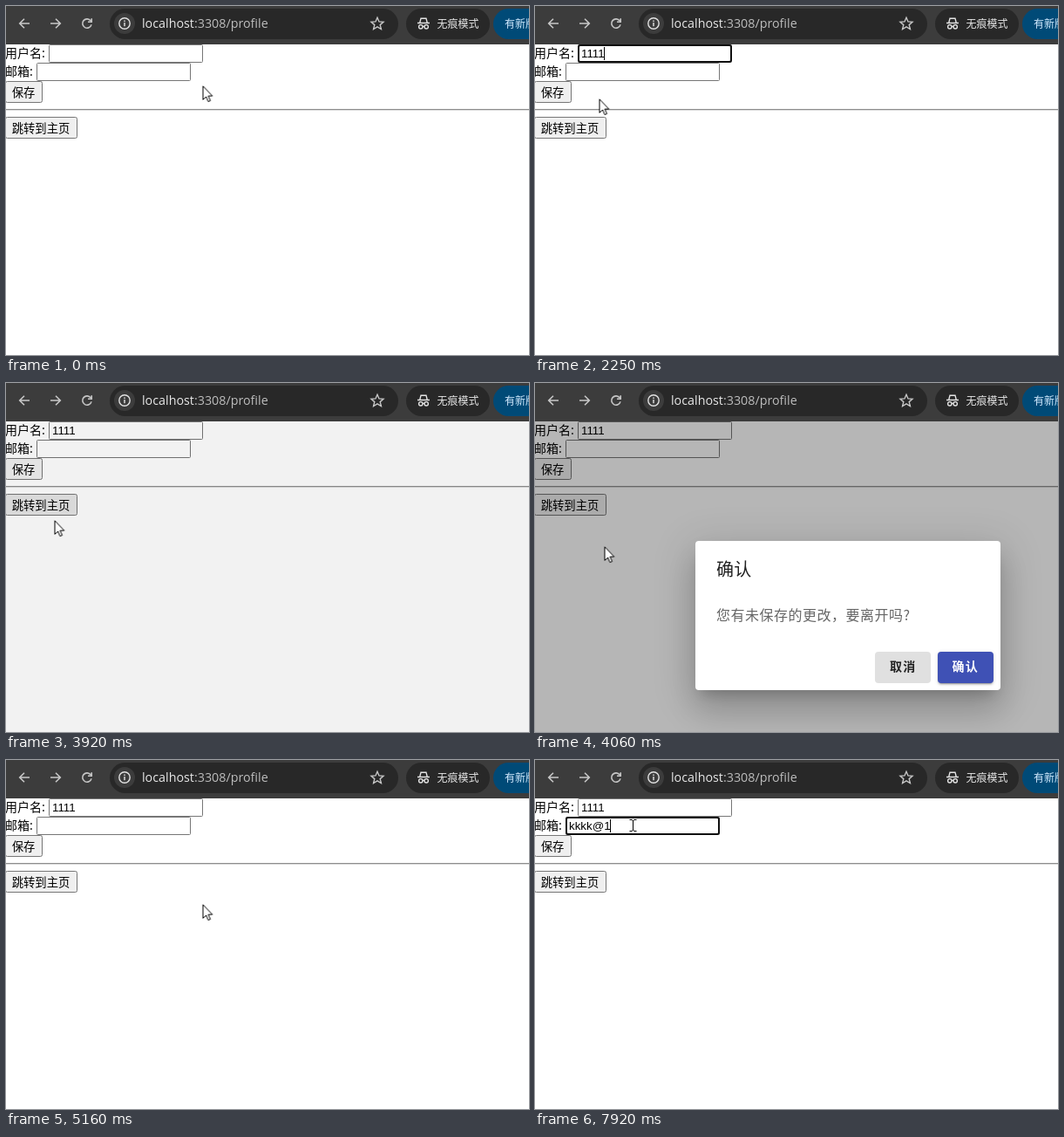
An HTML page for the animation above (8000 ms loop, 600x400 px).

```html
<!DOCTYPE html>
<html lang="zh-CN">
<head>
<meta charset="utf-8">
<title>Profile form</title>
<style>
html, body { margin: 0; width: 100%; height: 100%; overflow: hidden; background: #fff; }
body { position: relative; font-family: "Noto Sans CJK SC", "Noto Sans CJK", sans-serif; }
svg.layer { position: absolute; left: 0; top: 0; width: 600px; height: 400px; }
svg { display: block; }
.anim { animation: 8s step-end infinite; }

/* page */
.label { font-size: 14px; }
.btn text { font-size: 13.333px; }
.btn rect { fill: #efefef; stroke: #767676; }
.value { font: 13.333px "Liberation Sans", Arial, sans-serif; }
.box { fill: #fff; stroke: #767676; }
.ring { fill: none; stroke: #101010; stroke-width: 2; }

/* dialog */
.shade { position: absolute; left: 0; top: 44px; width: 600px; height: 356px; background: #000; }
.dialog {
  position: absolute; left: 184px; top: 181px; width: 350px; height: 171px;
  border-radius: 4px; background: #fff;
  box-shadow: 0 11px 15px -7px rgba(0,0,0,.2), 0 24px 38px 3px rgba(0,0,0,.14), 0 9px 46px 8px rgba(0,0,0,.12);
}
.dialog svg { position: absolute; left: 0; top: 0; }
.accept {
  position: absolute; left: 278px; top: 127px; width: 64px; height: 36px;
  border-radius: 4px; background: #3f51b5;
  box-shadow: 0 3px 1px -2px rgba(0,0,0,.2), 0 2px 2px rgba(0,0,0,.14), 0 1px 5px rgba(0,0,0,.12);
}
.title { font-size: 20px; letter-spacing: .25px; fill: rgba(0,0,0,.87); }
.message { font-size: 16px; letter-spacing: .5px; fill: rgba(0,0,0,.6); }
.action { font-size: 14px; font-weight: 700; letter-spacing: 1.25px; }

/* toolbar */
.icon { fill: none; stroke: #c7c7c7; stroke-width: 1.6; }
.url { font: 14.3px "Open Sans", "Noto Sans", sans-serif; fill: #bdbdbd; }
.pill { fill: #282828; }
.chip { font-size: 12px; }

/* timeline: percent = ms / 80 */
.cursor { animation-name: move; }
@keyframes move {
  0% { transform: translate(225.5px, 91px); animation-timing-function: steps(9); }
  7.775% { transform: translate(133px, 60px); }
  14.625% { transform: translate(136px, 62px); }
  24.625% { transform: translate(136px, 62px); animation-timing-function: steps(4); }
  28.125% { transform: translate(73.5px, 106px); animation-timing-function: steps(3); }
  30.75% { transform: translate(26px, 101px); }
  38.125% { transform: translate(26px, 101px); animation-timing-function: steps(6); }
  43.25% { transform: translate(43.5px, 142px); }
  48.125% { transform: translate(43.5px, 142px); animation-timing-function: steps(3); }
  50.75% { transform: translate(79.5px, 187px); animation-timing-function: steps(7); }
  56.875% { transform: translate(419px, 330px); }
  57.75% { transform: translate(417px, 329px); }
  62.75% { transform: translate(413px, 324px); animation-timing-function: steps(2); }
  64.5% { transform: translate(225.5px, 165px); animation-timing-function: steps(9); }
  72.25% { transform: translate(160px, 98px); animation-timing-function: steps(5); }
  76.5%, 100% { transform: translate(112px, 75px); }
}
.arrow { animation-name: arrow; }
@keyframes arrow {
  0%, 27.25%, 63.625% { opacity: 1; }
  1.73%, 56.875%, 74.8%, 100% { opacity: 0; }
}
.beam { animation-name: beam; }
@keyframes beam {
  0%, 27.25% { opacity: 0; }
  1.73%, 74.8%, 100% { opacity: 1; }
}
.hand { animation-name: hand; }
@keyframes hand {
  0%, 63.625%, 100% { opacity: 0; }
  56.875% { opacity: 1; }
}
.press { animation-name: press; }
@keyframes press {
  0%, 10.375%, 37.25%, 49%, 62.75%, 78.25%, 100% { opacity: 0; }
  8.625%, 36.5%, 47.375%, 61.875%, 77.375% { opacity: 1; }
}
.ring.name { animation-name: focus-name; }
@keyframes focus-name {
  0%, 36.5%, 100% { opacity: 0; }
  8.625% { opacity: 1; }
}
.ring.mail { animation-name: focus-mail; }
@keyframes focus-mail {
  0% { opacity: 0; }
  77.375%, 100% { opacity: 1; }
}
.caret.name { animation-name: blink-name; }
@keyframes blink-name {
  0%, 14.625%, 36.5%, 100% { opacity: 0; }
  8.625%, 15.5% { opacity: 1; }
}
.caret.mail { animation-name: blink-mail; }
@keyframes blink-mail {
  0%, 83.25% { opacity: 0; }
  77.375%, 85%, 100% { opacity: 1; }
}
.type.name { animation-name: type-name; }
@keyframes type-name {
  0% { transform: translateX(0); }
  15.5% { transform: translateX(7px); }
  18.75% { transform: translateX(13px); }
  21.25% { transform: translateX(20px); }
  22.875%, 100% { transform: translateX(26px); }
}
.type.mail { animation-name: type-mail; }
@keyframes type-mail {
  0% { transform: translateX(0); }
  85% { transform: translateX(7px); }
  86.625% { transform: translateX(13px); }
  89.125% { transform: translateX(20px); }
  90.75% { transform: translateX(27px); }
  95.625% { transform: translateX(40px); }
  99%, 100% { transform: translateX(47px); }
}
.save rect { animation-name: save; }
@keyframes save {
  0%, 39.83%, 100% { fill: #efefef; }
  29.875%, 37.25% { fill: #e5e5e5; }
  36.5% { fill: #f5f5f5; }
}
.home rect { animation-name: home; }
@keyframes home {
  0%, 50.75%, 100% { fill: #efefef; }
  41.54%, 49% { fill: #e5e5e5; }
  47.375% { fill: #f5f5f5; }
}
.shade { animation-name: shade; }
@keyframes shade {
  0%, 64.5%, 100% { opacity: 0; }
  49% { opacity: .05; }
  49.875% { opacity: .2; }
  50.75% { opacity: .286; }
  51.625% { opacity: .305; }
  53.375% { opacity: .32; }
  62.75% { opacity: .295; }
  63.625% { opacity: .14; }
}
.dialog { animation-name: dialog; }
@keyframes dialog {
  0%, 63.625%, 100% { opacity: 0; transform: none; }
  49.875% { opacity: .6; transform: scale(.93); }
  50.75% { opacity: 1; transform: none; }
  62.75% { opacity: .8; transform: none; }
}
.ripple { animation-name: ripple; }
@keyframes ripple {
  0%, 63.625%, 100% { opacity: 0; transform: scale(.4); }
  61.875% { opacity: .06; transform: scale(.4); }
  62.75% { opacity: .11; transform: none; }
}
</style>
</head>
<body>

<svg class="layer" viewBox="0 0 600 400">
  <text class="label" x="-1" y="59">用户名:</text>
  <text class="label" x="-1" y="80">邮箱:</text>

  <rect class="box" x="49.5" y="44.5" width="176" height="20" rx="1"/>
  <text class="value" x="53" y="59">1111</text>
  <svg x="51" y="46" width="173" height="17">
    <g class="type name anim">
      <rect x="2" width="180" height="17" fill="#fff"/>
      <rect class="caret name anim" x="2" y="1" width="1" height="15"/>
    </g>
  </svg>
  <rect class="ring name anim" x="50" y="45" width="175" height="19" rx="2"/>

  <rect class="box" x="35.5" y="65.5" width="176" height="20" rx="1"/>
  <text class="value" x="39" y="80">kkkk@1</text>
  <svg x="37" y="67" width="173" height="17">
    <g class="type mail anim">
      <rect x="2" width="180" height="17" fill="#fff"/>
      <rect class="caret mail anim" x="2" y="1" width="1" height="15"/>
    </g>
  </svg>
  <rect class="ring mail anim" x="36" y="66" width="175" height="19" rx="2"/>

  <g class="btn save">
    <rect class="anim" x="-.5" y="86.5" width="42" height="24" rx="2"/>
    <text x="6.7" y="104">保存</text>
  </g>
  <path d="M0 118.5H600" stroke="#8e8e8e"/>
  <path d="M0 119.5H600" stroke="#d8d8d8"/>
  <g class="btn home">
    <rect class="anim" x="-.5" y="127.5" width="82" height="24" rx="2"/>
    <text x="6.7" y="145">跳转到主页</text>
  </g>
</svg>

<div class="shade anim"></div>
<div class="dialog anim">
  <div class="accept"></div>
  <svg width="350" height="171">
    <text class="title" x="24" y="40">确认</text>
    <text class="message" x="24" y="91">您有未保存的更改，要离开吗?</text>
    <rect x="206" y="127" width="64" height="36" rx="4" fill="#e0e0e0"/>
    <svg x="206" y="127" width="64" height="36">
      <g transform="translate(28 22)"><circle class="ripple anim" r="27"/></g>
    </svg>
    <text class="action" x="223" y="149" fill="#212121">取消</text>
    <text class="action" x="294.5" y="149" fill="#fff">确认</text>
  </svg>
</div>

<svg class="layer" viewBox="0 0 600 400">
  <rect width="600" height="44" fill="#3c3c3c"/>
  <g class="icon">
    <path d="M27 20H16M21 14.7L15.7 20 21 25.3"/>
    <path d="M51 20H62M57 14.7L62.3 20 57 25.3"/>
    <path d="M97.2 17A5.2 5.2 0 1 0 98 21.4M98.2 14.2V18.2H94"/>
  </g>
  <rect class="pill" x="119" y="3" width="331" height="35" rx="17.5"/>
  <circle cx="136" cy="20" r="12" fill="#3c3c3c"/>
  <g class="icon" style="stroke:#e3e3e3;stroke-width:1.4">
    <circle cx="136" cy="20" r="6.2"/>
    <path d="M136 19V23.3M136 16.4V17.9"/>
  </g>
  <text class="url" x="156" y="25"><tspan fill="#e8e8e8">localhost</tspan>:3308/profile</text>
  <path class="icon" style="stroke-width:1.4" d="M426 13.2L428 17.9 433 18.3 429.2 21.6 430.4 26.5 426 23.9 421.6 26.5 422.8 21.6 419 18.3 424 17.9Z"/>

  <rect class="pill" x="459" y="3" width="96" height="35" rx="17.5"/>
  <g class="icon" style="stroke:#e3e3e3;stroke-width:1.4">
    <path d="M472 19.5H486M474.8 19L476 14.2H482L483.2 19"/>
    <circle cx="475.8" cy="23.8" r="2.2"/>
    <circle cx="482.2" cy="23.8" r="2.2"/>
    <path d="M478 23.4H480"/>
  </g>
  <text class="chip" x="494.5" y="25" fill="#e8e8e8">无痕模式</text>
  <rect x="559" y="3" width="80" height="35" rx="17.5" fill="#004a77"/>
  <text class="chip" x="572" y="25" fill="#d3ebff">有新版</text>

  <g class="cursor anim">
    <circle class="press anim" r="13" fill="#ff0" fill-opacity=".6"/>
    <path class="arrow anim" d="M.5 .8V16.4L4.1 13 6.5 18.6 9 17.5 6.6 12.1H11.3Z" fill="#fff" stroke="#000"/>
    <path class="beam anim" d="M-3.5 -6.5H-1L.5 -5.5 2 -6.5H4.5M.5 -5.5V5.5M-3.5 6.5H-1L.5 5.5 2 6.5H4.5" fill="none" stroke="#000"/>
    <g class="hand anim" stroke="#000" stroke-linejoin="round">
      <path fill="#fff" d="M-1.5 14V2Q-1.5 .5 0 .5T1.7 2V8Q4.5 6.4 5.2 8.7 8 7.4 8.5 9.7 11 9 11.2 11.5V16Q11 18.5 9 20.5V23.3H0V21.5L-5.5 14.8Q-6.3 12.5 -4 12.3Z"/>
      <path fill="none" d="M1.7 8V12.5M5.2 8.7V12.5M8.5 9.7V13"/>
    </g>
  </g>
</svg>

</body>
</html>
```
